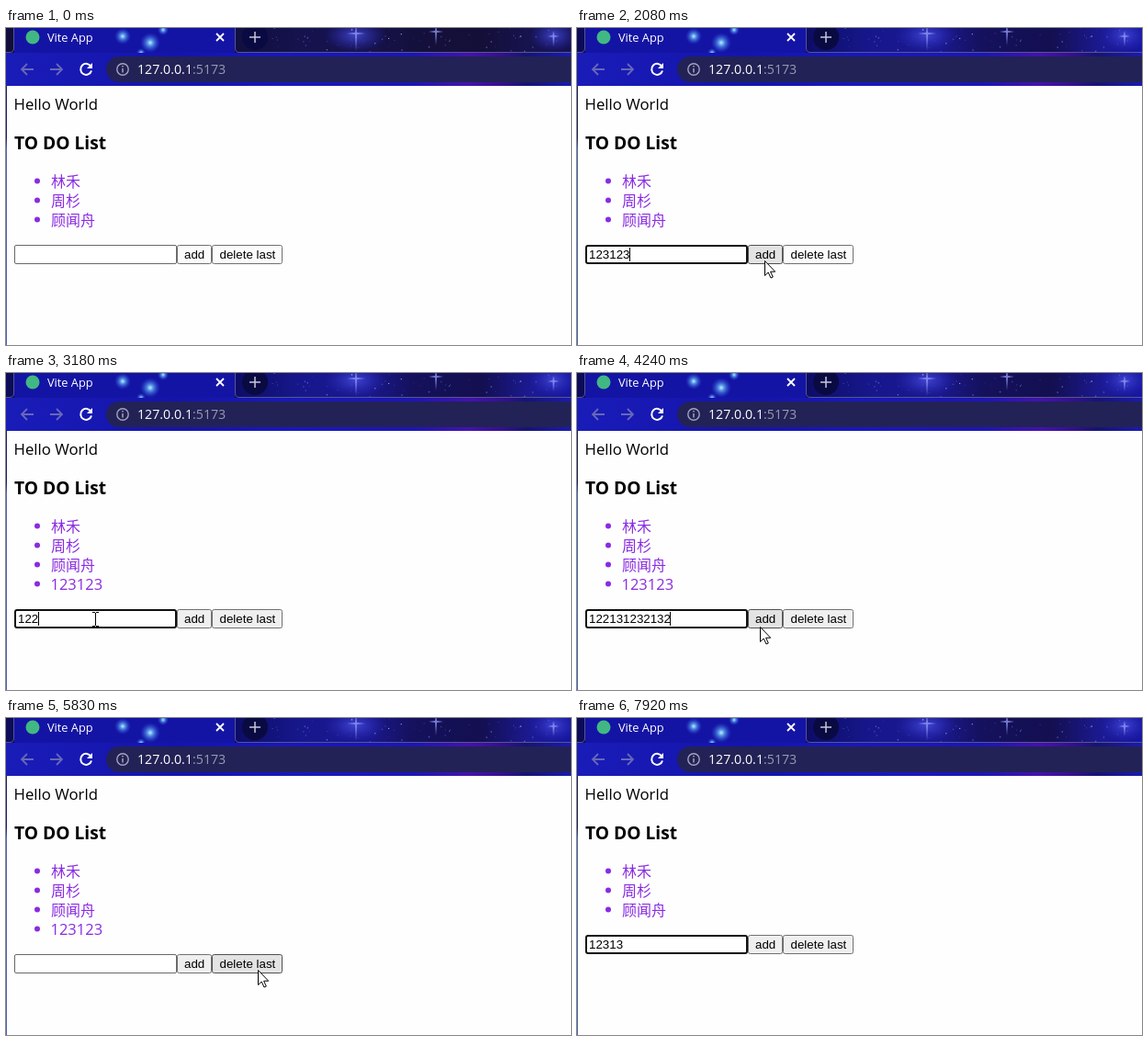
Animation of 615x345 px, one loop 8 s. Source, as an HTML page:

```html
<!DOCTYPE html>
<html lang="en">
<head>
<meta charset="utf-8">
<title>Vite App</title>
<style>
  html, body { margin: 0; width: 100%; height: 100%; overflow: hidden; background: #fefefe; }
  svg { display: block; width: 615px; height: 345px; }
  text { white-space: pre; }
  .ui { font-family: "Open Sans", "Noto Sans", sans-serif; font-weight: 500; }
  .page { font: 16.5px "Open Sans", "Noto Sans CJK SC", "Noto Sans CJK", sans-serif; }
  .han { font: 300 16px "Noto Sans CJK SC", "Noto Sans CJK", sans-serif; }
  .form { font: 13.333px "Liberation Sans", Arial, sans-serif; }
  .line { fill: none; stroke-width: 1.8; }
</style>
</head>
<body>
<svg viewBox="0 0 615 345">
  <defs>
    <linearGradient id="bar">
      <stop offset="0" stop-color="#1a1cb8"/>
      <stop offset=".3" stop-color="#1414ac"/>
      <stop offset=".5" stop-color="#1818bc"/>
      <stop offset=".72" stop-color="#1c16b4"/>
      <stop offset=".82" stop-color="#4412ac"/>
      <stop offset=".88" stop-color="#34108c"/>
      <stop offset=".92" stop-color="#161474"/>
      <stop offset="1" stop-color="#1a1ab0"/>
    </linearGradient>
    <linearGradient id="sky">
      <stop offset="0" stop-color="#0c0c58"/>
      <stop offset=".41" stop-color="#0d0d68"/>
      <stop offset=".52" stop-color="#17178c"/>
      <stop offset=".64" stop-color="#1a1890"/>
      <stop offset=".72" stop-color="#15115c"/>
      <stop offset=".84" stop-color="#130f50"/>
      <stop offset=".93" stop-color="#1c1a94"/>
      <stop offset="1" stop-color="#1616a0"/>
    </linearGradient>
    <linearGradient id="edge" x2="0" y2="1">
      <stop offset=".2" stop-color="#1e2060"/>
      <stop offset=".24" stop-color="#4a66b4"/>
    </linearGradient>
    <radialGradient id="glow">
      <stop offset="0" stop-color="#c4f0ff"/>
      <stop offset=".3" stop-color="#5fa8f0" stop-opacity=".85"/>
      <stop offset="1" stop-color="#2a48d8" stop-opacity="0"/>
    </radialGradient>
    <radialGradient id="haze">
      <stop offset="0" stop-color="#4a50e0" stop-opacity=".8"/>
      <stop offset="1" stop-color="#2a2cc0" stop-opacity="0"/>
    </radialGradient>
  </defs>

  <rect width="615" height="345" fill="#fefefe"/>
  <rect y="63" width="1" height="282" fill="url(#edge)"/>

  <g id="chrome">
    <rect width="615" height="63" fill="url(#bar)"/>
    <rect width="615" height="27" fill="url(#sky)"/>
    <rect id="dusk" width="615" height="27" fill="#14102c" opacity=".65"/>
    <path d="M9 0H249V27H9Z" fill="#1414a4"/>
    <svg id="stars" width="615" height="27"></svg>
    <path d="M0 26.5H4Q8.500 26.500 8.500 22V0M249.500 0V22Q249.500 26.500 254 26.500H615" fill="none" stroke="#56568c"/>
    <circle cx="29" cy="10" r="7.500" fill="#41b883"/>
    <text class="ui" x="45" y="15" font-size="12.800" fill="#fff">Vite App</text>
    <path class="line" d="M229 6l8 8m0-8l-8 8" stroke="#fff"/>
    <circle cx="271" cy="10" r="14" fill="#0a0a42"/>
    <path class="line" d="M265 10h12m-6-6v12" stroke="#c8c8dc" style="stroke-width:1.500"/>
    <g class="line" stroke="#6668b8">
      <path d="M30 45H17m6-6l-6 6l6 6"/>
      <path d="M48 45H61m-6-6l6 6l-6 6"/>
    </g>
    <path class="line" d="M92.500 42A6 6 0 1 0 93 46.500" stroke="#fff" style="stroke-width:2"/>
    <path d="M94 38V44H88Z" fill="#fff"/>
    <path d="M615 31H123a14 14 0 0 0 0 28H615Z" fill="#222256"/>
    <circle class="line" cx="127" cy="45" r="6.200" stroke="#a4a4bc" style="stroke-width:1.400"/>
    <path d="M127 44v4.500m0-7.500v1.600" stroke="#a4a4bc" stroke-width="1.500"/>
    <text class="ui" x="143" y="50" font-size="14.200" fill="#fff">127.0.0.1<tspan fill="#9a9ab2" font-weight="400">:5173</tspan></text>
  </g>

  <text class="page" x="8.500" y="89" style="font-size:16.800px">Hello World</text>
  <text class="page" x="9" y="132" style="font-size:19.200px;font-weight:700">TO DO List</text>
  <g id="list" fill="#8a2be2"></g>

  <g id="form" class="form">
    <rect id="field" fill="#fff"/>
    <text id="value" x="13" y="15"></text>
    <path id="caret" stroke="#000"/>
    <g id="add">
      <rect x="186.500" y=".5" width="37" height="20" rx="2"/>
      <text x="194" y="15">add</text>
    </g>
    <g id="del">
      <rect x="224.500" y=".5" width="76" height="20" rx="2"/>
      <text x="232.500" y="15">delete last</text>
    </g>
  </g>

  <path id="arrow" d="M.5 .5V16.500L4.200 13L7 19L9.300 18L6.600 12.200H11.700Z" fill="#fff" stroke="#000"/>
  <path id="beam" d="M-3 -6.500H0M1 -6.500H4M-3 8.500H0M1 8.500H4M.5 -6V8" fill="none" stroke="#000"/>
</svg>

<script>
const LOOP = 8000;
const ROW = 21;
const $ = id => document.getElementById(id);

// Bursts of repaints: start, end, number of steps
const bursts = [
  [500, 1120, 5], [1550, 2480, 8], [2630, 3580, 8], [3740, 4660, 8],
  [4800, 5370, 5], [5670, 6390, 6], [6700, 7620, 8], [7770, 7920, 2]
];

// Pointer path: time, x, y
const path = [
  [500, 296, 302], [1000, 98, 247], [1700, 98, 247], [1950, 160, 250],
  [2080, 204, 253], [2480, 204, 255], [2630, 206, 276], [2900, 97, 267],
  [3850, 97, 267], [4230, 199, 276], [4800, 199, 277], [5225, 272, 298],
  [5670, 272, 298], [5810, 274, 274], [5960, 274, 274], [6100, 300, 325],
  [6390, 150, 254], [6700, 145, 254], [7620, 145, 254], [7770, 333, 326]
];

const typing = [
  { text: '123123', start: 1550, rate: 75, clear: 2300 },
  { text: '1221312321321', start: 2940, rate: 115, clear: 4790 },
  { text: '12313', start: 7050, rate: 110, clear: LOOP }
];
const focusSpans = [[960, 2200], [2890, 4650], [6950, LOOP]];
const presses = [[2200, 2300], [4650, 4790]];

const items = [
  { text: '林禾', han: true }, { text: '周杉', han: true }, { text: '顾闻舟', han: true },
  { text: '123123', from: 2300, to: 5950 },
  { text: '1221312321321', from: 4790, to: 5660 }
];

const within = (spans, t) => spans.some(([a, b]) => t >= a && t < b);
const show = (id, on) => set($(id), { visibility: on ? 'visible' : 'hidden' });

function make(parent, tag, attrs, text = '') {
  const el = document.createElementNS('http://www.w3.org/2000/svg', tag);
  set(el, attrs);
  el.textContent = text;
  parent.append(el);
  return el;
}

function set(el, attrs) {
  for (const key in attrs) el.setAttribute(key, attrs[key]);
}

function drawSky() {
  let seed = 11;
  const rand = () => (seed = seed * 16807 % 2147483647) / 2147483647;
  const sky = $('stars');
  for (const [cx, rx] of [[380, 34], [596, 26]])
    make(sky, 'ellipse', { cx, cy: 8, rx, ry: 18, fill: 'url(#haze)' });
  for (let i = 0; i < 70; i++) {
    make(sky, 'circle', {
      cx: 290 + rand() * 325, cy: rand() * 26, r: 0.3 + rand() * 0.6,
      fill: rand() < 0.4 ? '#a9b0f8' : '#5558c8', opacity: 0.3 + rand() * 0.6
    });
  }
  for (const [x, y, r] of [[127, 9, 9], [157, 16, 11], [171, 2, 6], [147, 27, 5]])
    make(sky, 'circle', { cx: x, cy: y, r, fill: 'url(#glow)' });
  for (const [x, y, s] of [[381, 5, 9], [468, 3, 7], [596, 8, 5]])
    make(sky, 'path', {
      d: `M${x} ${y - s}l1 ${s}l${s} 1l-${s} 1l-1 ${s * 2}l-1 -${s * 2}l-${s} -1l${s} -1Z`,
      fill: '#8f96f0', opacity: 0.8
    });
}

function snap(t) {
  let shown = 0;
  for (const [start, end, count] of bursts) {
    if (t < start) break;
    const gap = (end - start) / (count - 1);
    shown = start + gap * Math.min(count - 1, Math.floor((t - start) / gap + 0.25));
  }
  return shown;
}

function pointerAt(t) {
  if (t < 500 || t >= 7919) return null;
  const i = path.findIndex(p => p[0] > t);
  if (i < 0) return path[path.length - 1].slice(1);
  const [a, b] = [path[i - 1], path[i]];
  const k = (t - a[0]) / (b[0] - a[0]);
  return [1, 2].map(n => Math.round(a[n] + (b[n] - a[n]) * k));
}

function typedAt(t) {
  const run = typing.find(r => t >= r.start && t < r.clear);
  return run ? run.text.slice(0, 1 + Math.floor((t - run.start) / run.rate)) : '';
}

function paintButton(id, hover, pressed, t) {
  set($(id).firstElementChild, {
    fill: pressed ? '#f5f5f5' : hover ? '#e3e3e3' : t < 2300 ? '#fbfbfb' : '#efefef',
    stroke: hover ? '#505050' : '#707070'
  });
}

const rows = items.map((item, i) => {
  const row = make($('list'), 'g', {});
  make(row, 'circle', { cx: 34, cy: 166.5 + i * ROW, r: 3 });
  make(row, 'text', {
    class: item.han ? 'han' : 'page', x: item.han ? 49 : 48.5, y: 172.5 + i * ROW
  }, item.text);
  return row;
});

function render(time) {
  const t = snap(time % LOOP);
  show('dusk', t < 500);

  let count = 0;
  items.forEach((item, i) => {
    const on = item.han || (t >= item.from && t < item.to);
    count += on ? 1 : 0;
    set(rows[i], { visibility: on ? 'visible' : 'hidden' });
  });
  const top = 236 + (count - 3) * ROW;
  set($('form'), { transform: `translate(0 ${top})` });

  const focus = within(focusSpans, t);
  set($('field'), focus
    ? { x: 10, y: 1, width: 175, height: 19, rx: 2, stroke: '#101010', 'stroke-width': 2 }
    : { x: 9.5, y: 0.5, width: 176, height: 20, rx: 1.5, stroke: '#686868', 'stroke-width': 1 });
  const value = typedAt(t);
  $('value').textContent = value;
  const caretX = Math.floor(13 + value.length * 7.415) + 0.5;
  set($('caret'), { d: `M${caretX} 3V18` });
  show('caret', focus && t < 7770);

  const pointer = pointerAt(t);
  const [x, y] = pointer || [-99, -99];
  const over = (a, b) => x >= a && x < b && y >= top && y < top + ROW;
  const inField = over(9, 186);
  paintButton('add', over(186, 224), within(presses, t), t);
  paintButton('del', over(224, 301), false, t);

  for (const id of ['arrow', 'beam']) set($(id), { transform: `translate(${x} ${y})` });
  show('arrow', pointer && !inField);
  show('beam', pointer && inField);
}

drawSky();
const begin = performance.now();
function tick() {
  render(performance.now() - begin);
  requestAnimationFrame(tick);
}
tick();
</script>
</body>
</html>
```
